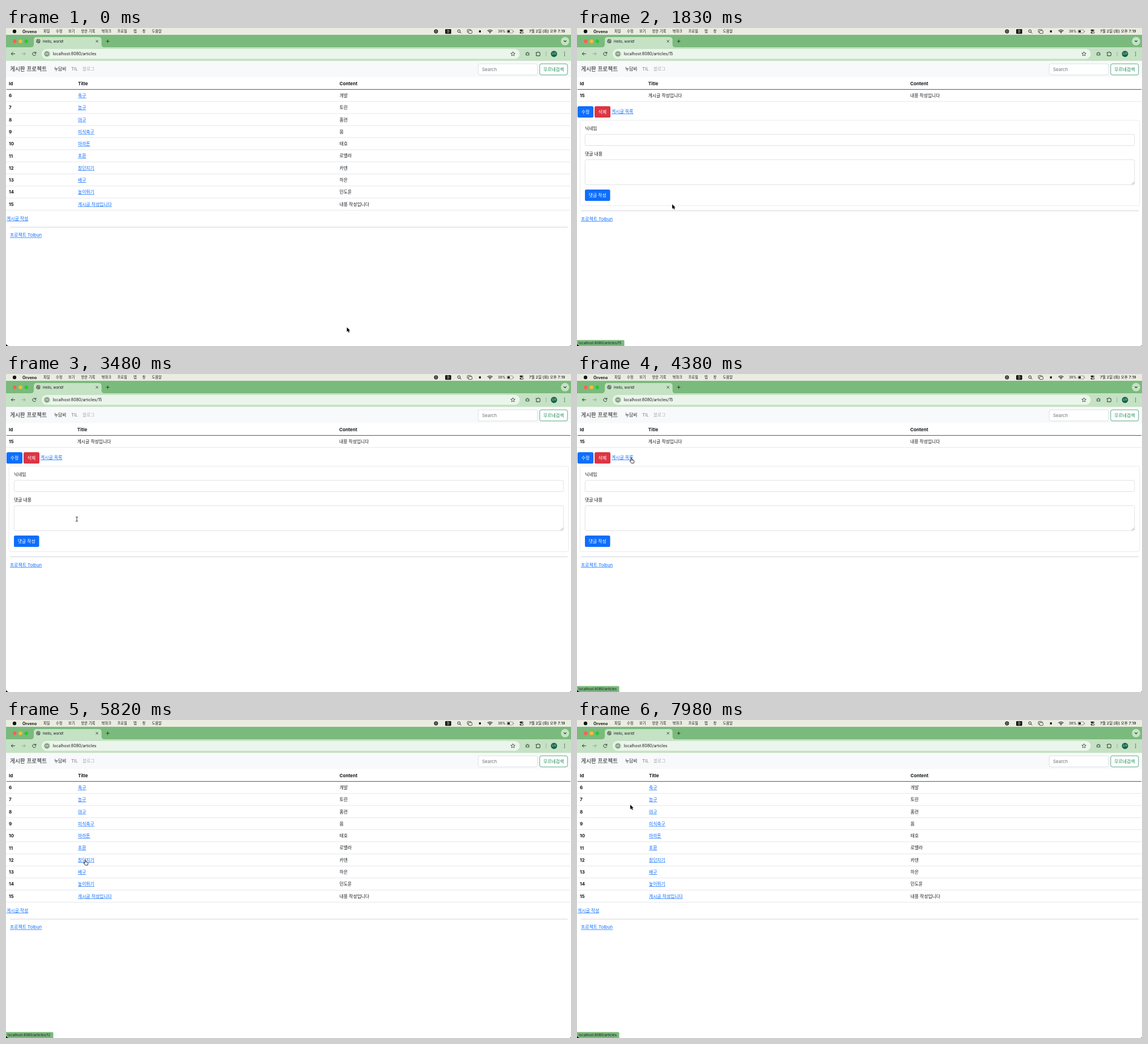
Write an HTML page that moves like this. It is 997 px wide and 561 px high and loops after 8 s.

```html
<!DOCTYPE html>
<html lang="ko">
<head>
<meta charset="utf-8">
<title>게시판 프로젝트</title>
<style>
html, body { margin: 0; width: 100%; height: 100%; overflow: hidden; background: #fff; }
svg { display: block; width: 100vw; height: 100vh; }
text { font-family: Inter, "Noto Sans CJK KR", "Noto Sans CJK", sans-serif; fill: #16191c; white-space: pre; }
.b { font-weight: 700; }
.m { font-weight: 500; }
.w { fill: #fff; font-weight: 500; }
.link { fill: #0d6efd; text-decoration: underline; text-decoration-thickness: .6px; text-decoration-skip-ink: none; }
</style>
</head>
<body>
<svg id="stage" viewBox="0 0 997 561" xmlns="http://www.w3.org/2000/svg"></svg>
<script>
const LOOP = 8000;
const STRIP = '#7aba7c', BAR = '#c5e2c4', INK = '#1f2b20', BORDER = '#ced4da', RULE = '#dee2e6';

// Text is placed by its left edge and vertical middle.
const text = (x, mid, s, size = 7.85, cls = '', extra = '') =>
  `<text x="${x}" y="${(mid + size * .365).toFixed(2)}" font-size="${size}" class="${cls}" ${extra}>${s}</text>`;
const rect = (x, y, w, h, fill, r = 0, stroke = 'none') =>
  `<rect x="${x}" y="${y}" width="${w}" height="${h}" rx="${r}" fill="${fill}" stroke="${stroke}" stroke-width=".7"/>`;
const circle = (x, y, r, fill, stroke = 'none', sw = .8) =>
  `<circle cx="${x}" cy="${y}" r="${r}" fill="${fill}" stroke="${stroke}" stroke-width="${sw}"/>`;
const line = (d, stroke = INK, sw = .9) =>
  `<path d="${d}" fill="none" stroke="${stroke}" stroke-width="${sw}" stroke-linecap="round" stroke-linejoin="round"/>`;
const rule = (y, color, x1 = 1, x2 = 996) => rect(x1, y, x2 - x1, .8, color);
const centered = 'text-anchor="middle"';
const button = (x, y, w, h, fill, s) =>
  rect(x, y, w, h, fill, 2.6) + text(x + w / 2, y + h / 2, s, 7.85, 'w', centered);

function menuBar() {
  const items = [[66, '파일'], [88, '수정'], [110, '보기'], [132.5, '방문 기록'], [168.5, '북마크'],
    [196.5, '프로필'], [225, '탭'], [240.5, '창'], [257.5, '도움말']];
  return rect(0, 0, 997, 12, '#ebece1') +
    circle(15, 6, 3.2, '#111') +
    text(29, 6, 'Orveno', 7, 'b') +
    items.map(([x, s]) => text(x, 6, s, 6.25, 'm')).join('') +
    circle(758.8, 6, 2.7, '#fff', '#111', 1.5) + circle(758.8, 6, 1.3, '#111') +
    rect(775, 2, 10.5, 8.2, '#111', 1.2) + text(780.2, 6.1, '한', 6, 'w', centered) +
    circle(799.2, 5.4, 2.3, 'none', '#111', .9) + line('M801 7.2L803 9.2', '#111') +
    rect(814, 2.6, 6.6, 5, 'none', 1, '#111') + rect(816, 4.5, 6.4, 5, '#ebece1', 1, '#111') +
    rect(834.7, 4.2, 3.2, 3.6, '#111') +
    line('M850 4.8Q854 1.6 858 4.8M851.6 6.5Q854 4.7 856.4 6.5', '#111', 1.1) + circle(854, 8.3, 1, '#111') +
    text(868, 6.1, '38%', 6) +
    rect(884, 3.2, 10.6, 5.6, 'none', 1.5, '#777') + rect(885, 4.2, 4, 3.6, '#111', .7) + rect(895.4, 5, .9, 2, '#777') +
    rect(906.5, 2.7, 6.6, 2.7, '#111', 1.3) + circle(911.7, 4.05, .8, '#fff') +
    rect(906.8, 6.8, 6.2, 2.5, 'none', 1.2, '#111') + circle(908.2, 8.05, .9, '#111') +
    text(923, 6, '7월 2일 (화) 오후 7:19', 6.7, 'm');
}

function tabStrip() {
  return rect(0, 12, 997, 22, STRIP) +
    ['#fe5f57', '#febc2e', '#2ac63f'].map((c, i) => circle(15.3 + i * 10.2, 23.4, 3.2, c)).join('') +
    `<path d="M44 34Q49 34 49 29V21Q49 16 54 16H163.500Q168.500 16 168.500 21V29Q168.500 34 173.500 34Z" fill="${BAR}"/>` +
    circle(57, 23.3, 3.7, '#5c655d') + line('M54.500 22L56.500 23.500L56 26M57.500 20.500L58 22.500L60 23.200', BAR, .9) +
    text(65, 23.3, 'Hello, world!', 6.2) +
    line('M158.900 21.700L162.300 25.100M162.300 21.700L158.900 25.100') +
    line('M177 23.400H182M179.500 20.900V25.900') +
    circle(986.5, 23.2, 7.4, BAR) + line('M984.500 22.300L986.500 24.300L988.500 22.300', INK, 1.1);
}

function toolbar() {
  const star = Array.from({ length: 10 }, (_, i) => {
    const a = i * Math.PI / 5, r = i % 2 ? 1.8 : 4;
    return `${(894.5 + r * Math.sin(a)).toFixed(2)},${(45.8 - r * Math.cos(a)).toFixed(2)}`;
  }).join(' ');
  return rect(0, 34, 997, 24, BAR) +
    line('M15.500 45.500H9.500M12 42.800L9.300 45.500L12 48.200') +
    line('M28 45.500H34M31.500 42.800L34.200 45.500L31.500 48.200', '#8ba48b') +
    line('M52.300 44A3 3 0 1 0 52.600 46.800M52.800 42.300V44.500H50.600') +
    rect(63, 37, 843.5, 17.2, '#ecf5eb', 8.6) +
    circle(72.2, 45.7, 6.2, BAR) + circle(72.2, 45.7, 3.5, 'none', INK) +
    line('M72.200 45.600V47.500', INK, .8) + circle(72.2, 43.9, .5, INK) +
    `<polygon points="${star}" fill="none" stroke="${INK}" stroke-width=".75" stroke-linejoin="round"/>` +
    rect(916.8, 43.4, 6.8, 5, '#657c66', 1) + rect(918.7, 42.3, 3, 2, '#657c66', .5) + circle(920.2, 45.8, 1.5, BAR) +
    line('M935.700 43.200H938A1.100 1.100 0 0 1 940.200 43.200H942V45A1.200 1.200 0 0 1 942 47.200V49H935.700V47.200A1.200 1.200 0 0 0 935.700 45Z', INK, 1) +
    rect(952.6, 41.5, .8, 8.5, '#8eae8e') +
    circle(967, 45.7, 5.5, '#146449') + text(967, 45.8, '도현', 4, 'w', centered) +
    [42.7, 45.7, 48.7].map(y => circle(985.6, y, .75, INK)).join('');
}

function navBar() {
  return rect(0, 58, 997, 28.5, '#f8f9fa') +
    text(7, 72.3, '게시판 프로젝트', 9.7) +
    text(85, 72.5, '누담비', 7.7) +
    text(115, 72.5, 'TIL', 7.8, '', 'style="fill:#7c7d7e"') +
    text(135, 72.5, '블로그', 7.7, '', 'style="fill:#aaabac"') +
    rect(833.3, 63.2, 104.5, 19.6, '#fff', 3, BORDER) +
    text(840, 72.8, 'Search', 7.9, '', 'style="fill:#6c7075"') +
    rect(941.8, 63.2, 49, 19.6, '#fff', 3, '#198754') +
    text(966.3, 72.8, '무르네검색', 7.9, '', centered + ' style="fill:#198754"');
}

const head = (tx, cx) =>
  text(5, 98, 'Id', 8.1, 'b') + text(tx, 98, 'Title', 8.1, 'b') +
  text(cx, 98, 'Content', 8.1, 'b') + rule(107.9, '#212529');
const footer = y => rule(y, '#c6c8ca', 7, 991) + text(7, y + 14.8, '프로젝트 Tolbun', 7.85, 'link');
const address = s => text(82.5, 45.6, s, 7.1);

const ROWS = [['축구', '개발'], ['농구', '토린'], ['야구', '홈런'], ['미식축구', '몸'], ['마라톤', '태호'],
  ['포환', '로벨라'], ['창던지기', '카덴'], ['배구', '하은'], ['높이뛰기', '민도윤'], ['게시글 작성입니다', '내용 작성입니다']];
const FIRST_ID = 6;
const rowY = i => 119.1 + i * 21.3;

function listPage() {
  return address('localhost:8080/articles') + head(127, 588.5) +
    ROWS.map(([title, body], i) => text(5, rowY(i), FIRST_ID + i, 8.1, 'b') +
      text(127, rowY(i), title, 7.8, 'link') + text(588.5, rowY(i), body, 7.8) +
      rule(rowY(i) + 10.1, RULE)).join('') +
    text(1, 336.3, '게시글 작성', 7.85, 'link') + footer(350.8);
}

function articlePage(id, tx, cx) {
  const [title, body] = ROWS[id - FIRST_ID];
  return address('localhost:8080/articles/' + id) + head(tx, cx) +
    text(5, 119.1, id, 8.1, 'b') + text(tx, 119.1, title, 7.8) + text(cx, 119.1, body, 7.8) + rule(129.2, RULE) +
    button(1, 138, 28, 20, '#0d6efd', '수정') + button(31, 138, 28, 20, '#dc3545', '삭제') +
    text(61, 147.2, '게시글 목록', 7.85, 'link') +
    rect(5.3, 162.8, 987.4, 150.5, '#fff', 3, '#dfe1e3') +
    text(14, 177.2, '닉네임', 7.8) + rect(14.2, 187.7, 969.6, 19.8, '#fff', 3, BORDER) +
    text(14, 221.7, '댓글 내용', 7.8) + rect(14.2, 232.3, 969.6, 44.2, '#fff', 3, BORDER) +
    line('M979 275.500L983 271.500M981.300 275.500L983 273.800', '#777', .6) +
    button(14, 285, 44.5, 20, '#0d6efd', '댓글 작성') + footer(322.1);
}

const POINTERS = {
  arrow: '<path d="M0 0V8L1.900 6.300L3.200 9.200L4.600 8.600L3.300 5.800H5.700Z" fill="#000" stroke="#fff" stroke-width=".8" paint-order="stroke"/>',
  beam: line('M-1.700 -4Q0 -4 0 -2.800V2.800Q0 4 -1.700 4M1.700 -4Q0 -4 0 -2.800M0 2.800Q0 4 1.700 4', '#222', .9),
  hand: '<path d="M-.9 .5Q0 -.6 .9 .5V3.400L4 4.100Q5 4.400 4.800 5.600L4.200 9H-.2L-2.700 6Q-3 4.600 -1.700 5L-.9 5.700Z" fill="#fff" stroke="#000" stroke-width=".8" stroke-linejoin="round"/>'
};

const PAGES = [[0, 'list'], [1830, 'a15'], [4680, 'list'], [5850, 'a12'], [7800, 'list']];

// Pointer stops: time, x, y.
const PATH = [[480, 601.5, 528], [1170, 168.5, 319.5], [1310, 168, 311], [2280, 168, 311], [2860, 146, 245],
  [3480, 125, 256], [3640, 125, 256], [4200, 96, 148], [4720, 96, 149], [4980, 96, 165], [5440, 140, 247],
  [6080, 140, 247], [6800, 96, 151.5], [6920, 96, 151.5], [7060, 94, 149.5]];

// Link preview: path suffix, then fade-in start and fade-out start.
const PREVIEWS = [['/15', 1330, 1940], ['', 4180, 4910], ['/12', 5480, 6060], ['', 7080, 9000]];

const group = (id, body) => `<g id="${id}">${body}</g>`;
const stage = document.getElementById('stage');
stage.innerHTML = rect(0, 0, 997, 561, '#fff') + menuBar() + tabStrip() + toolbar() + navBar() +
  group('list', listPage()) + group('a15', articlePage(15, 125.7, 588)) + group('a12', articlePage(12, 188.7, 576)) +
  group('preview', '<path id="bubble"/>' + text(3, 555.7, '', 6.17, '', 'id="url"')) +
  '<path d="M0 557Q1 560 5 561H0ZM997 559.500Q996.500 560.500 995 561H997Z" fill="#000"/>' +
  group('pointer', Object.entries(POINTERS).map(([id, body]) => group(id, body)).join(''));
const el = id => document.getElementById(id);
const show = (id, on) => el(id).setAttribute('display', on ? 'inline' : 'none');
el('bubble').setAttribute('fill', STRIP);

const clamp = v => Math.max(0, Math.min(1, v));
const ease = v => v * v * (3 - 2 * v);

function pointerAt(t) {
  const i = PATH.findIndex(p => p[0] > t);
  if (i < 0) return PATH[PATH.length - 1].slice(1);
  if (i === 0) return PATH[0].slice(1);
  const [t0, x0, y0] = PATH[i - 1], [t1, x1, y1] = PATH[i];
  const k = ease((t - t0) / (t1 - t0));
  return [x0 + (x1 - x0) * k, y0 + (y1 - y0) * k];
}

function pointerShape(page, x, y) {
  const inside = (x0, y0, x1, y1) => x >= x0 && x <= x1 && y >= y0 && y <= y1;
  if (page === 'list') {
    return ROWS.some(([s], i) => inside(127, rowY(i) - 5, 127 + s.length * 6.7, rowY(i) + 5)) ? 'hand' : 'arrow';
  }
  if (inside(61, 142, 99, 151) || inside(1, 138, 59, 158)) return 'hand';
  return inside(14, 188, 984, 207) || inside(14, 232, 984, 276) ? 'beam' : 'arrow';
}

function draw(t) {
  const page = PAGES.filter(p => p[0] <= t).pop()[1];
  ['list', 'a15', 'a12'].forEach(id => show(id, id === page));

  const [x, y] = pointerAt(t), shape = pointerShape(page, x, y);
  el('pointer').setAttribute('transform', `translate(${x.toFixed(2)} ${y.toFixed(2)})`);
  Object.keys(POINTERS).forEach(id => show(id, id === shape));

  const preview = PREVIEWS.filter(p => p[1] <= t).pop();
  show('preview', preview);
  if (preview) {
    const [suffix, start, end] = preview, w = suffix ? 83.5 : 74.5;
    el('url').textContent = 'localhost:8080/articles' + suffix;
    el('bubble').setAttribute('d', `M0 550.500H${w - 2}Q${w} 550.500 ${w} 552.500V561H0Z`);
    el('preview').setAttribute('opacity', Math.min(clamp((t - start) / 120), 1 - clamp((t - end) / 180)).toFixed(3));
  }
}

const begin = performance.now();
function tick() {
  draw((performance.now() - begin) % LOOP);
  requestAnimationFrame(tick);
}
tick();
</script>
</body>
</html>
```
